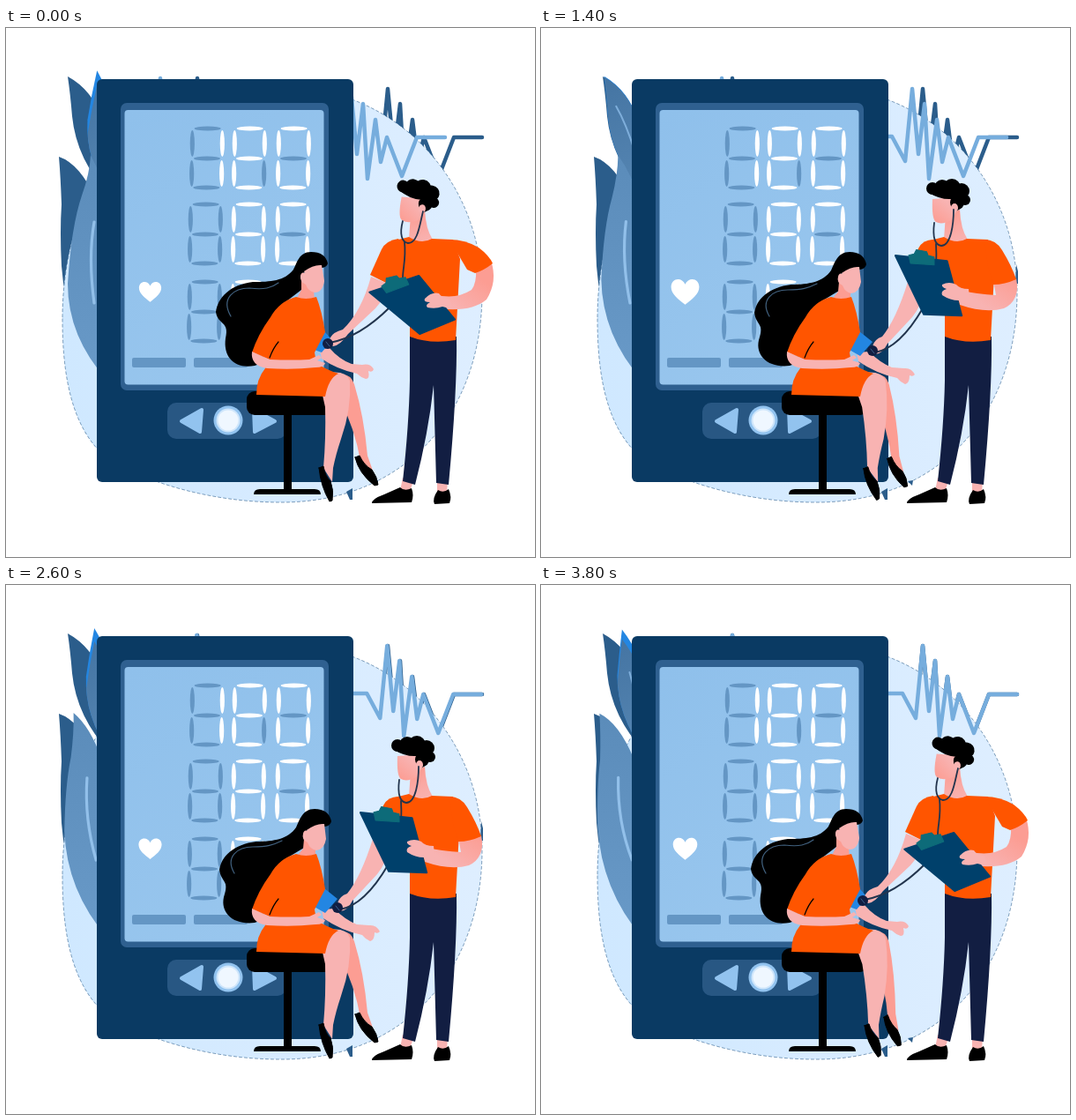
An HTML page with a canvas for the animation above (4 s loop, 600x600 px).

```html
<!DOCTYPE html>
<html lang="en">
<head>
<meta charset="utf-8">
<title>Blood pressure check</title>
<style>
html, body { margin: 0; width: 100%; height: 100%; overflow: hidden; background: #fff; }
canvas { display: block; width: 600px; height: 600px; }
</style>
</head>
<body>
<canvas id="stage" width="600" height="600"></canvas>
<script>
const ctx = document.getElementById('stage').getContext('2d');
const LOOP = 4000, STEP = 200, TAU = Math.PI * 2;
const C = {
  shade: '#2b5d8b', body: '#0a3a63', bezel: '#2f6090', off: '#6496c4',
  light: '#92c3ef', skin: '#f8b3b2', skin2: '#fc9d93', orange: '#ff5500',
  navy: '#121e42', black: '#000', tube: '#22344d', bright: '#2386e2'
};

// Blend the numbers of two paths that share one structure.
function mix(a, b, k) {
  const to = b.match(/-?[\d.]+/g);
  let i = 0;
  return a.replace(/-?[\d.]+/g, n => (+n + (to[i++] - n) * k).toFixed(2));
}

const lerp = (a, b, k) => a + (b - a) * k;

// Value at time t from [time, value] keys.
function keyed(t, keys) {
  let i = 1;
  while (i < keys.length - 1 && t > keys[i][0]) i++;
  const [t0, v0] = keys[i - 1], [t1, v1] = keys[i];
  return lerp(v0, v1, Math.min(1, Math.max(0, (t - t0) / (t1 - t0))));
}

function fill(color, d) {
  ctx.fillStyle = color;
  ctx.fill(new Path2D(d));
}

function line(color, width, d) {
  ctx.strokeStyle = color;
  ctx.lineWidth = width;
  ctx.lineCap = ctx.lineJoin = 'round';
  ctx.stroke(new Path2D(d));
}

// Filled shape with softly rounded corners.
function soft(color, r, d) {
  fill(color, d);
  line(color, r, d);
}

function box(color, x, y, w, h, r) {
  ctx.fillStyle = color;
  ctx.beginPath();
  ctx.roundRect(x, y, w, h, r);
  ctx.fill();
}

function disc(color, x, y, rx, ry = rx) {
  ctx.fillStyle = color;
  ctx.beginPath();
  ctx.ellipse(x, y, rx, ry, 0, 0, TAU);
  ctx.fill();
}

function ramp(x0, y0, x1, y1, a, b) {
  const g = ctx.createLinearGradient(x0, y0, x1, y1);
  g.addColorStop(0, a);
  g.addColorStop(1, b);
  return g;
}

const BLOB = 'M64 330C64 438 94 497 170 514C215 530 265 538 312 538' +
  'C455 538 540 435 540 300C540 200 480 115 395 82C330 55 270 58 240 64C140 85 64 190 64 330Z';
const PULSE = 'M150 123L209 123L217 57L225 123L410 123L425 151L433 69L440 143L447 86' +
  'L452 171L461 104L467 152L474 124L491 168L508 124L540 124';

const topLeaf = k => mix(
  'M70 55Q98 70 110 105L118 190Q80 150 75 100Q73 75 70 55Z',
  'M110 47Q130 90 130 130L118 190Q92 150 96 105Q102 75 110 47Z', k);
const lowLeaf = k => mix(
  'M60 146Q84 154 103 196L115 250L115 400Q68 345 63 270Q61 230 63 200Q62 170 60 146Z',
  'M96 144Q110 170 115 200L115 250L115 400Q70 350 70 290Q74 225 86 190Q95 165 96 144Z', k);

function backdrop(t) {
  const slide = -42 * Math.max(0, 1 - t / 3000) ** 2;
  const top = .5 + .5 * Math.cos(TAU * (t - 270) / 2000);
  const phase = t < 950 ? .5 + .5 * t / 950 : (t - 950) / 1333;
  const low = .5 - .5 * Math.cos(TAU * phase);

  // Still, darker copies behind the disc.
  line(C.shade, 4.5, PULSE);
  fill(C.shade, topLeaf(0));
  fill(C.shade, lowLeaf(0));
  fill(ramp(64, 0, 540, 0, '#cfe8ff', '#deeeff'), BLOB);
  ctx.setLineDash([3, 3]);
  line(C.shade, .6, BLOB);
  ctx.setLineDash([]);
  fill(C.shade, 'M386 526L393 522L393 535L390 535ZM416 514L422 513L421 519ZM539 268L541 276L541 290L538 290Z');

  ctx.save();
  ctx.translate(slide, 0);
  line('#76addd', 4.5, PULSE);
  ctx.restore();

  fill(C.bright, topLeaf(top));
  ctx.save();
  ctx.clip(new Path2D(topLeaf(top)));
  ctx.translate(0, top * 20);
  fill(ramp(70, 60, 110, 180, '#4575a3', '#5585b2'), topLeaf(top));
  line('#7eaedb', 2, mix('M84 88Q96 108 106 140', 'M114 88Q115 110 118 140', top));
  ctx.restore();
  fill(ramp(65, 150, 90, 390, '#5b8cba', '#6899c7'), lowLeaf(low));
  line('#92c0ea', 3.2, mix('M85 218Q85 270 104 312', 'M100 220Q93 260 100 312', low));
}

// Segments: top, upper left, upper right, middle, lower left, lower right, bottom.
function digit(x, y, on) {
  const segs = [[19, 2, 1], [2, 19, 0], [36, 19, 0], [19, 36, 1], [2, 53, 0], [36, 53, 0], [19, 69, 1]];
  segs.forEach(([dx, dy, flat], i) => {
    const px = x + dx - (dy - 35) * .02, py = y + dy;
    const a = flat ? 15 : 2.6, b = flat ? 2.6 : 15;
    disc(on[i] === '1' ? '#fff' : C.off, px, py, a, b);
  });
}

function monitor(t) {
  box(C.body, 103, 58, 291, 457, 6);
  box(C.bezel, 130, 85, 236, 326, 7);
  box(ramp(135, 100, 360, 400, '#8fc0eb', '#9ac7ee'), 134.5, 93, 226, 311.5, 4);

  digit(209, 112, '0010010');
  digit(257, 112, '1111101');
  digit(307, 112, '1110111');
  digit(207, 198, '0000000');
  digit(256, 198, '1111111');
  digit(306, 198, '1110111');
  digit(206, 286, '0000000');
  digit(255, 286, '1111111');
  box(C.off, 143, 374, 61, 11, 2);
  box(C.off, 213, 374, 61, 11, 2);

  const s = .96 + .165 * (1 - Math.cos(TAU * (t - 260) / 2000));
  ctx.save();
  ctx.translate(163.5, 299);
  ctx.scale(s, s);
  fill('#fff', 'M0 11.5C-6 7 -12.5 2 -12.5 -4.2C-12.5 -12 -3 -13.5 0 -6.5C3 -13.5 12.5 -12 12.5 -4.2C12.5 2 6 7 0 11.5Z');
  ctx.restore();

  box('#285783', 183, 425, 135, 41, 10);
  soft(C.light, 4, 'M199 446L222 433L220 458Z');
  soft(C.light, 4, 'M281 433L305 446L282 458Z');
  disc(C.light, 252, 445, 16.5);
  disc('#cfe6fb', 252, 445, 13.5);
  disc('#eff7ff', 252, 445, 11.5);
}

function stool() {
  box(C.black, 315, 430, 9, 97, 0);
  box(C.black, 273, 412, 98, 27, 9);
  fill(C.black, 'M281 529Q281 523 288 523L350 523Q357 523 357 529Z');
}

function woman(t, q) {
  const near = keyed(t, [[0, 0], [400, .3], [800, .65], [1000, .9], [1400, .72], [1800, .3], [2200, 0], [3000, 0], [3200, .5], [3400, 1], [3600, .95], [3800, .8]]);
  const far = keyed(t, [[0, 0], [400, .5], [800, 1], [1000, .85], [1400, .3], [1800, .05], [2200, 0], [3000, 0], [3200, .45], [3400, .9], [3600, .85], [3800, .65]]);

  fill(C.skin2, mix(
    'M376 394Q390 390 395 404Q406 440 410 485L416 502L402 491Q396 455 378 420Z',
    'M376 394Q390 390 394 404Q399 440 398 487L400 508L389 494Q388 455 378 420Z', far));
  soft(C.black, 1, mix(
    'M396 487L401 485Q406 496 415 501Q421 509 422 518L418 519Q400 505 396 487Z',
    'M385 492L389 489Q392 500 398 506Q402 514 401 524L397 525Q386 509 385 492Z', far));
  fill(C.skin, mix(
    'M350 395Q384 384 390 400Q392 432 380 466Q374 484 371 499L370 515L360 499Q363 465 362 430L358 412Z',
    'M350 395Q384 384 391 400Q396 432 392 466Q388 484 386 499L387 515L374 499Q372 465 365 430L358 412Z', near));
  soft(C.black, 1, mix(
    'M355 499L360 497Q362 509 368 514Q372 524 370 536L367 537Q357 520 355 499Z',
    'M370 500L375 498Q378 508 386 514Q390 523 389 533L386 535Q372 518 370 500Z', near));

  // Far arm and cuff.
  fill(C.skin, mix(
    'M358 368L372 367Q385 380 398 385L412 386Q420 385 424 393Q422 396 418 394Q418 403 413 404Q408 402 404 397Q380 392 360 378Z',
    'M356 365L367 363Q378 376 392 381L404 382Q413 380 417 387Q416 391 411 389Q413 398 408 398Q402 396 398 392Q375 387 358 375Z', q));
  fill(C.bright, mix('M361 344L376 356L362 372L348 364Z', 'M361 344L370 354L358 368L347 364Z', q));

  // Hair.
  fill(C.black, mix(
    'M369 268Q366 254 350 254C336 254 333 267 329 275C320 288 304 291 284 291C258 294 244 308 242 323C244 338 254 334 247 354C243 372 258 386 282 383C299 380 300 340 318 310L338 298L340 279Q353 273 362 274Q368 273 369 268Z',
    'M365 267Q362 254 346 254C332 254 330 267 326 274C316 287 300 288 280 288C254 291 240 306 238 322C240 337 254 332 249 352C246 374 260 387 282 383C299 380 300 340 318 310L335 297L337 278Q350 271 359 272Q364 271 365 267Z', q));
  line('#41617f', 1.2, mix(
    'M259 327C248 308 263 297 280 297C296 297 303 295 313 290',
    'M255 327C243 306 259 295 276 295C293 297 301 295 309 289', q));

  // Neck and face.
  fill(C.skin2, mix('M338 288L351 298L351 310L328 310L337 299Z', 'M335 286L349 297L350 310L328 310L335 297Z', q));
  fill(C.skin, mix(
    'M341 278Q352 270 361 271L363 288Q361 300 352 301Q345 300 342 292Q335 289 337 282Q338 277 342 279Z',
    'M338 276Q349 268 358 269L361 287Q359 300 350 300Q343 299 340 291Q333 288 334 281Q335 276 339 278Z', q));

  // Dress.
  fill(C.orange, 'M329 305Q340 309 352 305Q358 320 362 345Q355 358 350 368L352 380Q364 388 377 392Q366 397 362 418L284 416Q284 398 294 386L299 376L279 368Q286 347 300 328Q310 310 329 305Z');
  line(C.black, 1.2, 'M299 374Q303 363 309 356');
  fill(C.skin, 'M279 367L299 376Q325 377 344 376L355 371L358 374L353 377L362 380Q361 385 351 385Q325 388 296 386Q277 383 279 367Z');
}

function head(q) {
  ctx.save();
  ctx.translate(462, 224);
  ctx.rotate(q * .15);
  ctx.translate(-462, -224);
  fill(ramp(446, 220, 462, 200, C.skin2, C.skin), 'M443 194L470 192L473 204Q468 210 466 217Q454 224 447 220Q442 217 443 194Z');
  [[443, 182, 7], [454, 181, 9], [465, 181, 10], [476, 185, 9], [480, 195, 6], [471, 198, 8]]
    .forEach(c => disc(C.black, ...c));
  fill(C.black, 'M439 187L475 185L475 203Q473 208 467 208L465 194Q452 195 439 187Z');
  disc(C.skin, 468, 204, 4, 5);
  ctx.restore();
}

function man(p, q) {
  ctx.save();
  ctx.translate(1, 0);

  // Ankles, shoes, trousers.
  fill(C.skin, 'M449 510L461 514L457 526L446 525ZM488 512L500 514L499 527L488 527Z');
  fill(C.black, 'M414 539Q414 534 428 529L446 521Q451 526 459 522Q462 530 459 538ZM485 540Q482 534 489 524Q495 528 501 523Q505 532 502 539Z');
  fill(C.navy, 'M457 346L510 350Q511 410 501 518L487 516L484 405Q478 460 463 518L449 514Q456 450 457 400Z');

  // Neck and torso.
  fill(ramp(460, 212, 470, 244, C.skin2, C.skin), 'M458 212L474 206Q475 228 483 240Q470 248 456 239Z');
  fill(C.orange, 'M456 237Q470 246 482 239L506 240L514 262L509 354Q480 359 457 350L457 300L432 290L426 256Q432 243 440 241Z');
  fill(C.orange, mix(
    'M444 240Q432 240 427 250L414 284L434 296L456 262Z',
    'M444 239Q430 241 425 251L412 280L434 291L458 262Z', q));

  // Arm that reaches to the patient.
  fill(C.skin, mix(
    'M415 288L433 296Q431 315 420 328L392 358Q386 370 378 370Q372 368 375 361Q377 353 386 350Q402 330 415 288Z',
    'M413 282L432 290Q429 306 418 318L387 347Q378 360 370 361Q364 357 367 351Q370 345 381 342Q402 322 413 282Z', q));

  // Stethoscope.
  line(C.tube, 2, mix(
    'M432 318C418 342 400 364 378 368',
    'M434 317C418 333 394 352 366 357', q));
  disc(C.navy, lerp(375, 364, q), lerp(366, 358, q), 6);
  line('#3a5f8a', 1, mix('M373 364L377 369', 'M362 356L366 361', q));

  head(q);
  line(C.tube, 1.8, mix(
    'M445 221C443 237 446 246 453 247C464 247 467 222 467 206',
    'M449 219C445 234 448 243 455 244C466 244 468 224 472 208', q));
  line(C.tube, 1.8, mix('M447 245C448 260 447 267 447 275', 'M451 243C453 262 449 272 449 284', q));

  // Arm that holds the board.
  fill(ramp(530, 280, 505, 318, C.skin2, C.skin), mix(
    'M512 286L538 284Q543 309 524 318Q503 324 474 314L470 297Q495 302 515 303Q514 297 512 286Z',
    'M532 273L549 264Q557 287 544 308Q526 323 488 318L485 302Q508 309 527 297Q533 289 532 273Z', p));
  fill(C.orange, mix(
    'M502 240Q515 240 522 252Q533 270 538 285Q525 291 512 291L506 270Z',
    'M502 240Q520 240 535 249Q547 258 551 267Q541 275 531 278Q522 274 508 273Z', p));

  // Clipboard and hand.
  ctx.save();
  ctx.translate(lerp(400, 410, p), lerp(257, 299, p));
  ctx.rotate(lerp(6, -18.5, p) * Math.PI / 180);
  soft('#00406b', 2, 'M1 1L60 1L83 61L40 64Z');
  soft('#0d6b79', 1, 'M16 -1L22 -3L24 -8L36 -7L38 -3L45 -2L46 7L19 8Z');
  ctx.restore();
  fill(C.skin, mix(
    'M484 296Q474 296 470 291Q462 287 454 291Q453 294 459 296Q452 298 454 303Q463 309 473 309L486 317Z',
    'M502 308Q494 307 490 301Q482 299 474 307Q472 311 480 311Q474 314 477 317Q486 319 494 316L506 319Z', p));
  ctx.restore();
}

function draw(t) {
  ctx.fillStyle = '#fff';
  ctx.fillRect(0, 0, 600, 600);
  const board = keyed(t, [[0, 1], [600, .95], [800, .66], [1000, .1], [1200, 0], [3200, 0], [3400, .28], [3600, .85], [3800, 1]]);
  const lean = keyed(t, [[0, 1], [200, 1], [400, .9], [600, .5], [800, .06], [1000, 0], [3200, 0], [3400, .6], [3600, .92], [3800, 1]]);
  backdrop(t);
  monitor(t);
  stool();
  woman(t, lean);
  man(board, lean);
}

const start = performance.now();
function tick() {
  const t = (performance.now() - start) % LOOP;
  draw(Math.floor(t / STEP) * STEP);
  requestAnimationFrame(tick);
}
tick();
</script>
</body>
</html>
```
